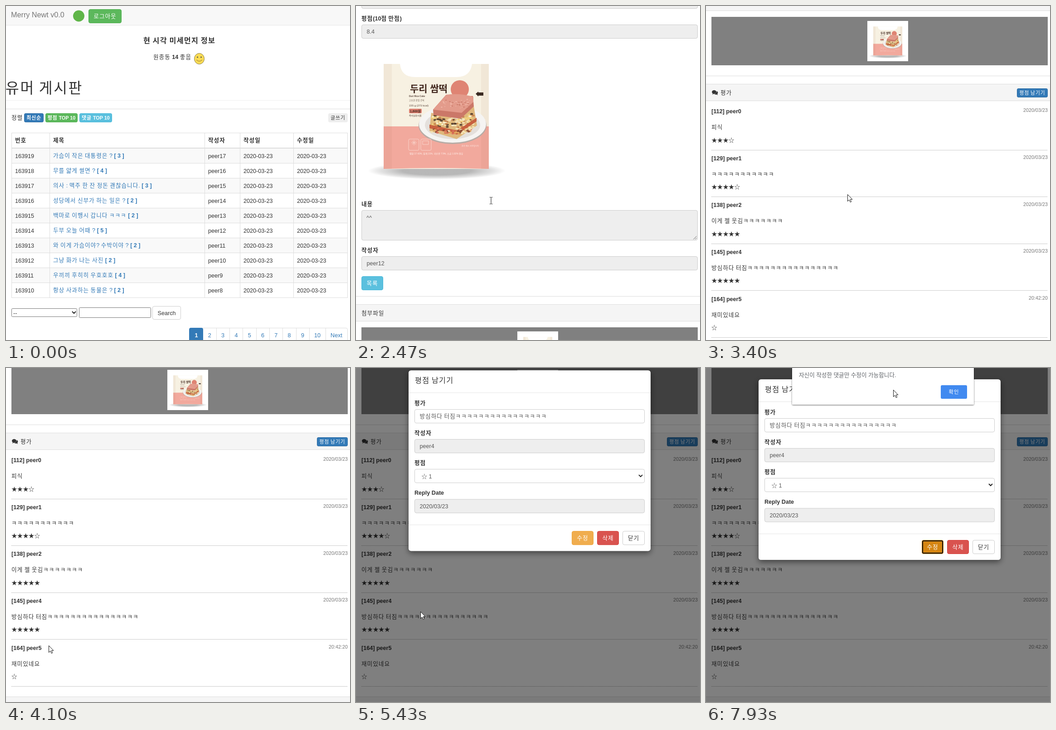
An HTML page that plays this animation: 759 by 738 pixels, repeating every 8 s.

```html
<!DOCTYPE html>
<html lang="ko">
<head>
<meta charset="utf-8">
<title>유머 게시판</title>
<style>
html, body { margin: 0; width: 100%; height: 100%; overflow: hidden; background: #fff; }
svg { display: block; width: 759px; height: 738px; font-family: "Liberation Sans", "Noto Sans CJK KR", sans-serif; }
.ko { letter-spacing: .08em; }
</style>
</head>
<body>
<svg id="stage" viewBox="0 0 759 738" lang="ko"></svg>
<script>
const BASE = 12.6, SMALL = 10.8, LARGE = 16.2;
const LINK = '#337ab7', RULE = '#ddd', INK = '#333', MUTED = '#555';

// Text is centred vertically on y; *stars* mark bold.
function text(x, y, s, { size = BASE, fill = INK, bold, weight = bold ? 700 : 400, anchor = 'start', plain } = {}) {
  let body = plain ? s : s.replace(/[\u3131-\ud79d]+/g, '<tspan class="ko">$&</tspan>');
  body = body.replace(/\*(.+?)\*/g, '<tspan font-weight="700">$1</tspan>');
  return `<text x="${x}" y="${y + size * .36}" font-size="${size}" fill="${fill}" text-anchor="${anchor}" font-weight="${weight}">${body}</text>`;
}
const fillRect = (x, y, w, h, fill) => `<rect x="${x}" y="${y}" width="${w}" height="${h}" fill="${fill}"/>`;
const box = (x, y, w, h, fill = '#fff', stroke = '#ccc', r = 3.6, id = '') =>
  `<rect ${id && `id="${id}"`} x="${x + .5}" y="${y + .5}" width="${w - 1}" height="${h - 1}" rx="${r}" fill="${fill}" stroke="${stroke}"/>`;
const hline = (y, x = 0, w = 759, color = RULE) => fillRect(x, y, w, 1, color);
const button = (x, y, w, h, s, fill, stroke, opts = {}) =>
  box(x, y, w, h, fill, stroke, opts.r ?? 3.6, opts.id) +
  text(x + w / 2, y + h / 2, s, { fill: '#fff', anchor: 'middle', ...opts });
const chevron = (x, y) => `<path d="M${x - 4} ${y - 2}l4 4 4-4" fill="none" stroke="#222" stroke-width="2"/>`;

function field(x, y, w, label, value, readonly = true) {
  return text(x, y, label, { bold: true }) + box(x, y + 14, w, 31, readonly ? '#eee' : '#fff') +
    text(x + 11.5, y + 29.5, value, { fill: MUTED });
}
const panelHead = (y, s, x = 12) => hline(y) + fillRect(0, y + 1, 759, 36, '#f5f5f5') + hline(y + 37) + text(x, y + 19, s);

const navbar = () => fillRect(0, 0, 759, 42, '#f8f8f8') + hline(42, 0, 759, '#e7e7e7') +
  text(11, 19.5, 'Merry Newt v0.0', { size: LARGE, fill: '#777' }) +
  '<circle cx="160.5" cy="22" r="12.5" fill="#5fb548"/>' +
  button(182, 7, 73, 31, '로그아웃', '#5cb85c', '#4cae4c');

const airQuality = () => text(382.5, 76, '현 시각 미세먼지 정보', { size: LARGE, bold: true, anchor: 'middle' }) +
  text(325, 112, '원종동 *14* 좋음') +
  `<ellipse cx="426.5" cy="116.5" rx="11" ry="12" fill="#fbdc55" stroke="#8a7c4a"/>
   <circle cx="422.5" cy="113" r="1.5" fill="#555"/><circle cx="430.5" cy="113" r="1.5" fill="#555"/>
   <path d="M420 119q6.500 6 13 0" fill="none" stroke="#8a6d2c"/>`;

const pageTitle = () => text(-1, 181, '유머 게시판', { size: 32.4, weight: 300 }) + hline(208, 0, 759, '#eee') + hline(227);

function listPage() {
  const posts = [
    ['가슴이 작은 대통령은 ?', 3], ['무를 얇게 썰면 ?', 4], ['의사 : 맥주 한 잔 정돈 괜찮습니다.', 3],
    ['성당에서 신부가 하는 일은 ?', 2], ['백마로 이행시 갑니다 ㅋㅋㅋ', 2], ['두부 오늘 어때 ?', 5],
    ['와 이게 가슴이야? 수박이야 ?', 2], ['그냥 화가 나는 사진', 2], ['우끼끼 후히히 우호호호', 4],
    ['항상 사과하는 동물은 ?', 2]];
  const columns = [20, 104, 446, 524, 642];
  const tag = { size: SMALL, bold: true, r: 2.7 };
  let out = navbar() + airQuality() + pageTitle() + text(12, 246, '정렬') +
    button(40, 237, 43, 20, '최신순', LINK, '#2e6da4', tag) +
    button(87, 237, 71, 20, '평점 TOP 10', '#5cb85c', '#4cae4c', tag) +
    button(162, 237, 72, 20, '댓글 TOP 10', '#5bc0de', '#46b8da', tag) +
    button(711, 237, 43, 20, '글쓰기', '#eee', '#eee', { size: SMALL, fill: INK, r: 2.7 });
  ['번호', '제목', '작성자', '작성일', '수정일'].forEach((s, i) => out += text(columns[i], 296.5, s, { bold: true }));
  posts.forEach(([title, count], i) => {
    const y = 331 + 33 * i;
    if (i % 2 == 0) out += fillRect(12, y - 16, 742, 32, '#f9f9f9');
    out += hline(y + 16, 12, 742) + text(20, y, `${163919 - i}`) +
      text(104, y - .5, `${title} *[ ${count} ]*`, { fill: LINK }) + text(446, y, `peer${17 - i}`) +
      text(524, y, '2020-03-23') + text(642, y, '2020-03-23');
  });
  out += hline(280, 12, 742) + fillRect(12, 313, 742, 2, RULE);
  [12, 96, 438, 516, 634, 753].forEach(x => out += fillRect(x, 280, 1, 365, RULE));
  out += '<path id="underline" d="M104 502.500H221" stroke="#23527c"/>';
  out += box(12, 668, 145, 19, '#fff', '#767676', 2) + text(16, 678, '--') + chevron(150, 677) +
    box(161, 666, 159, 23, '#fff', '#767676', 2) +
    button(323, 663, 63, 30, 'Search', '#fff', '#ccc', { fill: INK });
  out += box(404, 711, 350, 32, '#fff', RULE) + box(404, 711, 31, 40, LINK, LINK, 3);
  for (let i = 0; i < 11; i++) {
    const mid = i < 9 ? 420 + 29.3 * i : i == 9 ? 687 : 729;
    out += text(mid, 727, i < 10 ? `${i + 1}` : 'Next', { fill: i ? LINK : '#fff', anchor: 'middle', bold: !i });
    if (i > 1) out += fillRect(i < 10 ? Math.round(434.5 + 29.3 * (i - 1)) : 705, 711, 1, 32, RULE);
  }
  return out;
}

// Scatters small ellipses over a slanted block, the same way on every load.
function specks(count, colors, x, y, w, h, slant, rx, ry) {
  let seed = 7, out = '';
  const rnd = () => (seed = seed * 16807 % 2147483647) / 2147483647;
  for (let i = 0; i < count; i++) {
    const u = rnd(), v = rnd();
    const cy = y + h * v + slant * (u < .6 ? u : 1.6 - 2.4 * (u - .6) - 1);
    out += `<ellipse cx="${x + w * u}" cy="${cy}" rx="${rx}" ry="${ry}" fill="${colors[i % colors.length]}"/>`;
  }
  return out;
}

const photo = () => `<g id="photo">
  <ellipse cx="178" cy="364" rx="152" ry="19" fill="url(#shade)"/>
  <path d="M61 128H293V360H61Z" fill="#f7f1e2"/>
  <path d="M61 266H293V360Q177 356 61 360Z" fill="#f2a99d"/>
  <path d="M97 128H256Q252 157 222 157H130Q100 157 97 128Z" fill="#fff"/>
  <path d="M61 128H79V360H61ZM276 128H293V360H276Z" fill="#a06a50" opacity=".07"/>
  ${text(119, 182, '두리 쌈떡', { size: 21, bold: true, fill: '#43291f', plain: true })}
  <circle cx="229" cy="184" r="20" fill="#df8473"/>
  <path d="M264 194l6-5v2h11v7h-11v2z" fill="#3a2a22"/>
  ${text(117, 199, 'Duri Rice Cake', { size: 5, bold: true, fill: '#59453a' })}
  ${text(117, 208, '고소한 한입 간식', { size: 4.5, fill: '#59453a' })}
  ${text(117, 220, '155 g (273 kcal)', { size: 6, fill: '#59453a' })}
  <rect x="117" y="227" width="28" height="10" rx="2" fill="#dc8070"/>
  ${text(119, 232, '1,600원', { size: 7, bold: true, fill: '#43291f', plain: true })}
  ${text(117, 242, '즉석섭취식품', { size: 5, fill: '#59453a', plain: true })}
  <ellipse cx="213" cy="264" rx="75" ry="41" fill="#b7aca6"/>
  <ellipse cx="213" cy="261" rx="74" ry="41" fill="#f5f4f2"/>
  <ellipse cx="213" cy="263" rx="61" ry="31" fill="#e4e0dc"/>
  <path d="M166 236L225 250 260 222 267 264 222 294 162 276Z" fill="#dfb87c"/>
  ${specks(110, ['#f7edcb', '#efcf7c', '#5a4432', '#f3dfb0', '#c98550'], 167, 241, 92, 24, 12, 3.2, 2)}
  <path d="M162 262L223 275 266 247V255L223 284 162 270Z" fill="#c8603f"/>
  ${specks(50, ['#f3e2b4', '#8a4b34', '#e2a45f', '#d9705a'], 167, 269, 92, 10, 11, 3, 2)}
  <path d="M170 229L199 196 258 199 260 222 231 249 171 241Z" fill="#cb7868"/>
  <path d="M170 229L199 196Q232 192 259 201V212L233 236Z" fill="#e39b8b"/>
  ${specks(45, ['#f0b5a6', '#cf8070', '#e8a797'], 189, 206, 62, 19, 4, 1.8, 1.2)}
  <g fill="none" stroke="#f9d3ca"><rect x="116" y="294" width="23" height="25" rx="3"/><rect x="143" y="294" width="23" height="25" rx="3"/>
  <path d="M122 302h12M128 296v12M124 298l8 8M132 298l-8 8M147 298h13v8h-13z"/></g>
  ${text(118, 326, '멥쌀 17.42%, 참깨 21%, 국산콩 7.5%, 소금 1.02% 함유', { size: 5, fill: '#fff3ee', plain: true })}
  ${text(233, 310, '조리 예시 사진입니다', { size: 4, fill: '#fff3ee' })}
</g>`;

const TOP = 394; // body of the detail page starts this far down
function detailPage() {
  const replies = [
    [112, 0, '피식', '★★★☆'], [129, 1, 'ㅋ'.repeat(11), '★★★★☆'], [138, 2, '이게 젤 웃김' + 'ㅋ'.repeat(7), '★★★★★'],
    [145, 4, '방심하다 터짐' + 'ㅋ'.repeat(16), '★★★★★'], [164, 5, '재미있네요', '☆']];
  let body = field(12, -106, 742, '번호', '163914') + field(12, -40, 742, '제목', '두부 오늘 어때 ?') +
    field(12, 26, 742, '평점(10점 만점)', '8.4') + `<g transform="translate(0 -1)">${photo()}</g>` +
    text(12, 436, '내용', { bold: true }) + box(12, 450, 742, 67, '#eee') + text(23, 466, '^^', { fill: MUTED }) +
    '<path d="M744.500 514.500l7-7M748.500 514.500l3-3" stroke="#666"/>' +
    field(12, 538, 742, '작성자', 'peer12') +
    button(12, 596, 48, 31, '목록', '#5bc0de', '#46b8da') + hline(640) +
    panelHead(658, '첨부파일') + fillRect(12, 709, 742, 107, '#808080') + fillRect(356, 718, 90, 89, '#fff') +
    '<use href="#photo" transform="translate(352.200 695) scale(.276)"/>' +
    hline(839) + panelHead(857, '평가', 32) +
    `<path d="M13 875a5 4 0 1 1 4 4l-3 2 1-2.500q-2-1.500-2-3.500zM24 873q3 2 2 5l-1 1.500 1 2.500-3-1.500q-4 .5-5-1 5-.5 6-6.500z" fill="${INK}"/>` +
    button(686, 867, 68, 20, '평점 남기기', LINK, '#2e6da4', { size: SMALL, r: 2.7 });
  replies.forEach(([id, user, comment, stars], i) => {
    const y = 917.5 + 103.65 * i, line = Math.round(y + 85) + .5;
    body += text(12, y, `[${id}] peer${user}`, { bold: true }) +
      text(754, y - 2, i < 4 ? '2020/03/23' : '20:42:20', { size: SMALL, fill: '#777', anchor: 'end' }) +
      text(12, y + 35, comment) + text(12, y + 63.5, stars) +
      `<path d="M12 ${line}H754" stroke="#999" stroke-dasharray="1 1"/>`;
  });
  body += hline(1440) + fillRect(0, 1441, 759, 60, '#f5f5f5');
  return navbar() + `<g id="air">${airQuality()}</g>` + pageTitle() + panelHead(227, '게시글') +
    `<g transform="translate(0 ${TOP})">${body}</g>`;
}

const modal = () => '<rect x="116" y="25" width="534" height="399" rx="5.400" fill="#fff" filter="url(#modalShadow)"/>' +
  text(130, 47.5, '평점 남기기', { size: LARGE }) + hline(74, 116, 534, '#e5e5e5') +
  field(129, 97, 508, '평가', '방심하다 터짐' + 'ㅋ'.repeat(16), false) + field(129, 163, 508, '작성자', 'peer4') +
  field(129, 229, 508, '평점', '', false) + text(144.5, 259, '☆ 1', { fill: MUTED }) + chevron(628, 258) +
  field(129, 295.5, 508, 'Reply Date', '2020/03/23') + hline(366, 116, 534, '#e5e5e5') +
  button(476, 380, 48, 31, '수정', '#f0ad4e', '#eea236', { id: 'edit' }) +
  '<rect id="focus" x="478" y="382" width="44" height="27" rx="2" fill="none" stroke="#101010" stroke-width="2"/>' +
  button(532, 380, 48, 31, '삭제', '#d9534f', '#d43f3a') +
  button(588, 380, 49, 31, '닫기', '#fff', '#ccc', { fill: INK });

const alertBox = () => '<rect x="190" y="-10" width="401" height="91" rx="2" fill="#fff" filter="url(#alertShadow)"/>' +
  text(205, 15, '자신이 작성한 댓글만 수정이 가능합니다.', { fill: '#5f6368', plain: true }) +
  button(518, 38, 58, 30, '확인', '#418af0', '#418af0', { size: 11.5, r: 2 });

const cursors = `<g id="pointer" stroke="#111" fill="#fff" stroke-linejoin="round">
  <path id="arrow" d="M.5.5V15.500L4 12.300 6.300 17.500 8.700 16.500 6.400 11.300H10.800Z"/>
  <path id="hand" d="M-1.500 11V1.500Q0-1 1.500 1.500V7Q3 5.500 4.500 7.500 6 6 7.500 8.500 10 7.500 10 10V15L8 21H0L-5.500 13Q-5 10-1.500 13Z"/>
  <path id="beam" d="M-3-7.500H-1L0-6.500 1-7.500H3M0-6.500V6.500M-3 7.500H-1L0 6.500 1 7.500H3" fill="none"/></g>`;

stage.innerHTML = `<defs>
  <radialGradient id="shade"><stop offset=".5" stop-color="#888" stop-opacity=".6"/><stop offset=".8" stop-color="#999" stop-opacity=".3"/><stop offset="1" stop-color="#999" stop-opacity="0"/></radialGradient>
  <filter id="modalShadow" x="-10%" y="-10%" width="120%" height="125%"><feDropShadow dx="0" dy="4.500" stdDeviation="6.500" flood-opacity=".5"/></filter>
  <filter id="alertShadow" x="-10%" y="-10%" width="120%" height="130%"><feDropShadow dx="0" dy="1" stdDeviation="1.500" flood-opacity=".6"/></filter></defs>
  <rect width="759" height="738" fill="#fff"/>
  <g id="list">${listPage()}</g><g id="detail">${detailPage()}</g>
  <rect id="backdrop" width="759" height="738"/>
  <g id="dialog">${modal()}</g><g id="notice">${alertBox()}</g>${cursors}`;

const el = id => document.getElementById(id);
const set = (id, name, value) => el(id).setAttribute(name, value);
const show = (id, on) => set(id, 'visibility', on ? 'inherit' : 'hidden');
const ramp = (t, from, length) => Math.min(1, Math.max(0, (t - from) / length));

// Linear interpolation over rows of [time, ...values].
function track(rows, t) {
  const i = rows.findIndex(row => row[0] > t);
  if (i == 0) return rows[0].slice(1);
  if (i < 0) return rows.at(-1).slice(1);
  const a = rows[i - 1], b = rows[i], p = (t - a[0]) / (b[0] - a[0]);
  return a.slice(1).map((v, k) => v + (b[k + 1] - v) * p);
}

const scrollPath = [[2050, 0], [2470, 393], [2550, 393], [2710, 600], [2820, 600], [3020, 861], [3090, 861], [3300, 1060], [3560, 1108]];
const mousePath = [
  [460, 690, 690], [900, 200, 560], [1080, 22, 500], [1240, 85, 494], [1310, 168, 492], [1560, 168, 492], [1630, 169, 495],
  [2050, 169, 495], [2470, 298, 430], [2710, 298, 430], [3020, 312, 416], [3650, 312, 416], [4100, 94, 613], [4270, 97, 648],
  [4450, 97, 648], [4970, 142, 538], [6269, 142, 538], [6270, 443, 443], [6370, 443, 443], [6520, 497, 396], [7260, 497, 396],
  [7650, 386, 180], [7930, 413, 48]];

function draw(t) {
  const onDetail = t >= 1790;
  show('list', !onDetail);
  show('detail', onDetail);
  show('underline', !onDetail && t >= 1310);
  show('air', onDetail && t >= 1860);
  set('detail', 'transform', `translate(0 ${-Math.round(track(scrollPath, t)[0])})`);

  set('backdrop', 'opacity', .5 * ramp(t, 5083, 150));
  const slide = 1 - (1 - ramp(t, 5240, 300)) ** 2.2;
  set('dialog', 'opacity', ramp(t, 5240, 150));
  set('dialog', 'transform', `translate(0 ${-184 * (1 - slide)})`);
  const pressed = t >= 6740, hovered = t >= 6500;
  set('edit', 'fill', pressed ? '#d58512' : hovered ? '#ec971f' : '#f0ad4e');
  set('edit', 'stroke', pressed || hovered ? '#d58512' : '#eea236');
  show('focus', pressed);
  const drop = ramp(t, 6780, 220);
  set('notice', 'opacity', drop);
  set('notice', 'transform', `translate(0 ${-20 * (1 - drop) ** 2})`);

  const [x, y] = track(mousePath, t).map(Math.round);
  const hand = t >= 1310 && t < 1790 || t >= 6500 && t < 7310;
  const beam = t >= 2390 && t < 2710;
  show('pointer', t >= 460);
  show('hand', hand);
  show('beam', beam);
  show('arrow', !hand && !beam);
  set('pointer', 'transform', `translate(${x} ${y})`);
}

function frame(now) {
  draw(now % 8000);
  requestAnimationFrame(frame);
}
draw(0);
requestAnimationFrame(frame);
</script>
</body>
</html>
```
